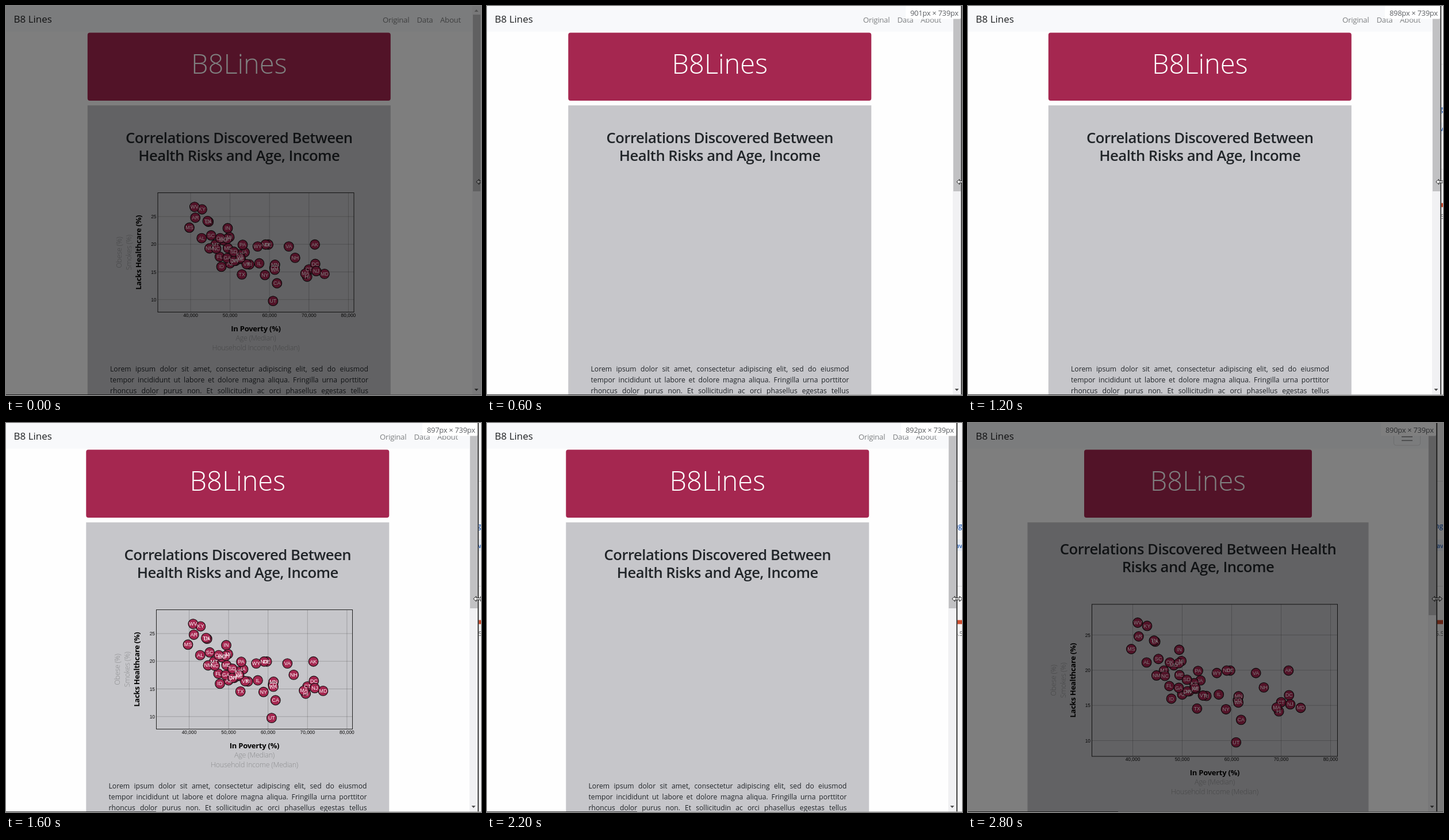
Recreate the animation shown at these times as an HTML page. Size 826 by 678 pixels, loop 3000 ms.

```html
<!DOCTYPE html>
<html lang="en">
<head>
<meta charset="utf-8">
<title>Health risks</title>
<style>
html, body { margin: 0; width: 100%; height: 100%; overflow: hidden; background: #fefefe; }
svg { display: block; width: 826px; height: 678px; }
text, p { font-family: "Open Sans", "Noto Sans", sans-serif; letter-spacing: -.02em; }
.brand { font-size: 17px; letter-spacing: 0; fill: #1d1f21; }
.link { font-size: 13.2px; fill: #7e8082; }
.hero { font-size: 47px; font-weight: 300; letter-spacing: 0; fill: #fff; }
.title { font-size: 25.7px; font-weight: 600; fill: #212529; }
.active { font-size: 13px; font-weight: 700; fill: #000; }
.idle { font-size: 12.5px; font-weight: 300; fill: #8c8d8f; }
.tick, .abbr { font: 8.4px "Liberation Sans", Arial, sans-serif; letter-spacing: 0; fill: #111; }
.abbr { font-size: 8.8px; fill: #fff; }
.size { font-size: 12.9px; fill: #5d6064; }
.behind { font-size: 12px; fill: #2a62b8; }
.mid { text-anchor: middle; }
.end { text-anchor: end; }
p { margin: 0; font-size: 12.2px; line-height: 19.4px; letter-spacing: 0; color: #212529;
    text-align: justify; text-align-last: justify; white-space: nowrap; }
p span { display: block; white-space: normal; }
</style>
</head>
<body>
<svg id="stage" viewBox="0 0 826 678"></svg>
<script>
const FRAME_MS = 200;
// [page width, layout, chart shown, dimmed]
const STEPS = [
  [902, 'narrow', 1, 1], [902, 'narrow', 1, 0], [902, 'narrow', 1, 0],
  [901, 'narrow', 0, 0], [899, 'narrow', 0, 0], [898, 'narrow', 0, 0],
  [898, 'narrow', 0, 0], [898, 'narrow', 1, 0], [897, 'narrow', 1, 0],
  [895, 'narrow', 0, 0], [893, 'narrow', 0, 0], [892, 'narrow', 0, 0],
  [890, 'wide', 0, 0], [890, 'wide', 1, 0], [890, 'wide', 1, 1]
];

// state, income in thousands, percentage
const POINTS = `AL 42.8 21.1,AK 71.5 19.95,AZ 50 16.55,AR 41.2 24.8,CA 61.9 12.95,CO 61.25 15.75,
CT 70 15.45,DE 59.7 19.95,DC 71.6 16.45,FL 47.4 17.75,GA 49.3 17.5,HI 69.55 14.15,ID 47.8 15.95,
IL 57.4 16.55,IN 49.4 22.9,IA 53.7 18.55,KS 52.4 18.15,KY 42.9 26.3,LA 44.55 24.05,ME 49.45 19.3,
MD 73.95 14.65,MA 69.1 14.7,MI 49.85 21.3,MN 61.4 16.3,MS 39.7 23,MO 48.3 20.7,MT 46.3 19.95,
NE 52.7 17.35,NV 51.4 17,NH 66.5 17.55,NJ 71.85 15.15,NM 44.8 19.25,NY 58.85 14.45,NC 46.5 19.2,
ND 59 19.95,OH 49.3 21,OK 47.5 21.1,OR 51.05 17,PA 53.2 19.9,RI 54.9 16.35,SC 45.2 21.6,
SD 50.95 18.65,TN 44.3 24.2,TX 53 14.55,UT 60.9 9.75,VT 54.2 16.4,VA 64.9 19.6,WA 61.35 15.4,
WV 41 26.75,WI 52.6 17.5,WY 57 19.6`.split(',').map(row => row.trim().split(' '));

// Horizontal values are measured from the page centre.
const LAYOUTS = {
  narrow: {
    hero: 263.5, panel: 263.5, titleY: 239,
    title: ['Correlations Discovered Between', 'Health Risks and Age, Income'],
    left: -141.3, top: 325.5, width: 341, height: 208, x40: -84.3, perK: 6.86, y25: 367, perPct: 9.65
  },
  wide: {
    hero: 198, panel: 296.5, titleY: 229,
    title: ['Correlations Discovered Between Health', 'Risks and Age, Income'],
    left: -184.5, top: 316, width: 427, height: 265, x40: -113.5, perK: 8.6, y25: 369.5, perPct: 12.27
  }
};
const LOREM = [
  'Lorem ipsum dolor sit amet, consectetur adipiscing elit, sed do eiusmod',
  'tempor incididunt ut labore et dolore magna aliqua. Fringilla urna porttitor',
  'rhoncus dolor purus non. Et sollicitudin ac orci phasellus egestas tellus'
];

const rect = (x, y, w, h, fill, extra = '') =>
  `<rect x="${x}" y="${y}" width="${w}" height="${h}" fill="${fill}" ${extra}/>`;
const text = (x, y, cls, str, extra = '') =>
  `<text x="${x}" y="${y}" class="${cls}" ${extra}>${str}</text>`;
const path = (d, stroke, extra = '') => `<path d="${d}" fill="none" stroke="${stroke}" ${extra}/>`;

function chart(l) {
  const bottom = l.top + l.height, right = l.left + l.width;
  const midX = l.left + l.width / 2, midY = l.top + l.height / 2;
  const px = k => l.x40 + (k - 40) * l.perK;
  const py = v => l.y25 + (25 - v) * l.perPct;
  const side = (dx, cls, str) => {
    const x = l.left - dx;
    return text(x, midY, cls + ' mid', str, `transform="rotate(-90 ${x} ${midY})"`);
  };
  let out = '';
  for (const k of [40, 50, 60, 70, 80]) {
    out += path(`M${px(k)} ${l.top}V${bottom}`, '#000', 'stroke-opacity=".2"') +
      text(px(k), bottom + 8.3, 'tick mid', k + ',000');
  }
  for (const v of [10, 15, 20, 25]) {
    out += path(`M${l.left} ${py(v)}H${right}`, '#000', 'stroke-opacity=".2"') +
      text(l.left - 2.5, py(v) + 3, 'tick end', v);
  }
  out += rect(l.left, l.top, l.width, l.height, 'none', 'stroke="#222"');
  for (const [, k, v] of POINTS) {
    out += `<circle cx="${px(k)}" cy="${py(v)}" r="8.4" fill="#a52750" stroke="#111" stroke-width="1.1"/>`;
  }
  for (const [name, k, v] of POINTS) out += text(px(k), py(v) + 3, 'abbr mid', name);
  return out +
    text(midX, bottom + 33, 'active mid', 'In Poverty (%)') +
    text(midX, bottom + 49, 'idle mid', 'Age (Median)') +
    text(midX, bottom + 66, 'idle mid', 'Household Income (Median)') +
    side(29, 'active', 'Lacks Healthcare (%)') +
    side(46, 'idle', 'Smokes (%)') +
    side(63, 'idle', 'Obese (%)');
}

function page(name) {
  const l = LAYOUTS[name];
  const lorem = name === 'narrow'
    ? `<foreignObject x="-224.3" y="622.5" width="449" height="56"><p>${
        LOREM.map(s => `<span>${s}</span>`).join('')}</p></foreignObject>`
    : '';
  return `<g id="${name}">` +
    rect(-l.hero, 46.6, l.hero * 2, 118.4, '#a52750', 'rx="4"') +
    text(0, 118, 'hero mid', 'B8Lines') +
    rect(-l.panel, 173.2, l.panel * 2, 505, '#c6c6ca') +
    l.title.map((s, i) => text(0, l.titleY + i * 31.3, 'title mid', s)).join('') +
    `<g id="${name}Chart">${chart(l)}</g>${lorem}</g>`;
}

const backdrop = rect(800, 0, 26, 678, '#f5f5f6') +
  path('M800 101.5H826M800 284.5H826', '#ddd') +
  rect(800, 203, 26, 20, '#e8eef6') +
  text(812, 184, 'behind', 'ng', 'font-weight="600"') +
  text(815, 218, 'behind', 'av', 'font-weight="600" style="font-size:10.5px"') +
  rect(800, 343.5, 26, 7, '#cf4f30') +
  text(813, 371, 'behind', '5.5', 'style="fill:#666;font-size:10.5px"');

const links = text(655, 28.5, 'link', 'Original') + text(714.5, 28.5, 'link', 'Data') +
  text(755, 28.5, 'link', 'About');
const toggler = rect(751.5, 8.5, 46, 30.5, 'none', 'rx="4" stroke="#dcdddf"') +
  path('M765 17.5H784M765 24H784M765 30.5H784', '#7c7e80', 'stroke-width="1.6"');
const scrollbar = rect(811, 0, 15, 678, '#f1f1f3') +
  '<rect id="thumb" x="812" y="15" width="13" fill="#c1c1c3"/>' +
  '<path d="M814.5 10l3.5-4 3.5 4z" fill="#a3a3a3"/>' +
  '<path d="M814.5 667l3.5 4 3.5-4z" fill="#505050"/>';
const resizing = '<g id="resizing">' + rect(825.2, 0, 2, 678, '#3c3c3c') +
  rect(729, 0, 96, 22.5, '#fff', 'rx="2"') + text(820.7, 17, 'size end', '', 'id="size"') + '</g>';
const cursor = '<path d="M817.8 306.5l5-4.5v3h8v-3l5 4.5-5 4.5v-3h-8v3z" fill="#fff" stroke="#111"/>';

document.getElementById('stage').innerHTML = backdrop +
  '<g id="sheet">' + rect(-100, 0, 926, 678, '#fefefe') + rect(-100, 0, 911, 44.5, '#f8f9fb') + '</g>' +
  text(13.5, 29, 'brand', 'B8 Lines') + page('narrow') + page('wide') +
  `<g id="edge"><g id="links">${links}</g><g id="toggler">${toggler}</g>${scrollbar}${resizing}${cursor}</g>` +
  rect(0, 677, 826, 1, '#a8a8a8') + rect(0, 677, 261, 1, '#3a3a3a') +
  rect(0, 0, 826, 678, '#000', 'id="dim" opacity=".5"');

const el = id => document.getElementById(id);
const show = (id, on) => { el(id).style.display = on ? '' : 'none'; };
const move = (id, x) => el(id).setAttribute('transform', `translate(${x} 0)`);

function draw([width, layout, chartOn, dimmed]) {
  const shift = Math.round((902 - width) * .916);
  const wide = layout === 'wide';
  move('sheet', -shift);
  move('edge', -shift);
  move(layout, wide ? 400 : 405.3 - shift / 2);
  show('narrow', !wide);
  show('wide', wide);
  show(layout + 'Chart', chartOn);
  show('links', !wide);
  show('toggler', wide);
  show('resizing', width < 902);
  show('dim', dimmed);
  el('size').textContent = `${width}px × 739px`;
  el('thumb').setAttribute('height', wide ? 320 : 308);
}

const start = performance.now();
let last = -1;
function tick() {
  const step = Math.floor((performance.now() - start) / FRAME_MS) % STEPS.length;
  if (step !== last) draw(STEPS[last = step]);
  requestAnimationFrame(tick);
}
tick();
</script>
</body>
</html>
```
